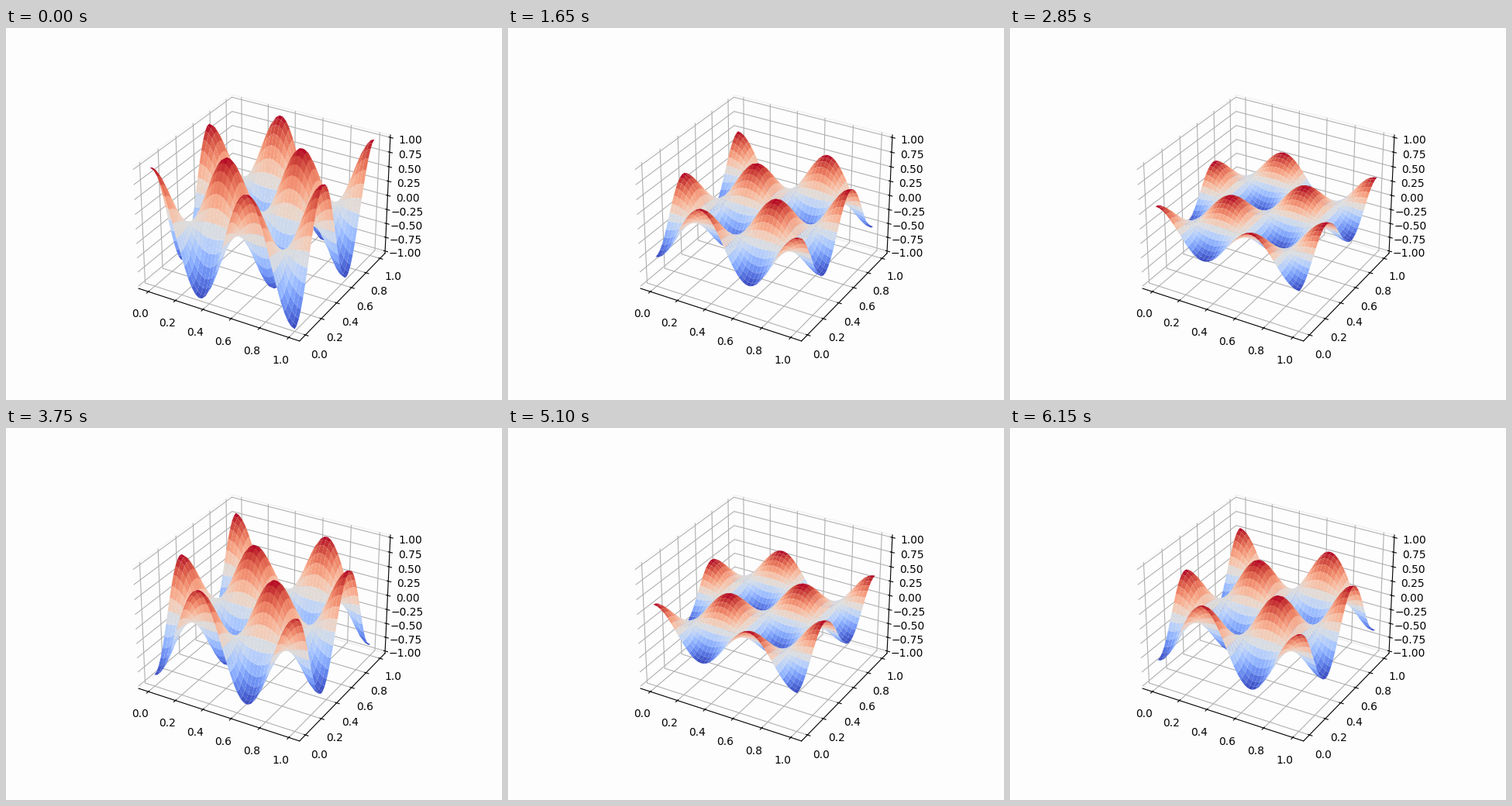
These frames come from a looping animation (640x480 px, 6.3 s). A matplotlib script:

```python
import numpy as np
import matplotlib.pyplot as plt
from matplotlib.animation import FuncAnimation

FRAMES = 42
INTERVAL = 150
CELLS = 40
MODE = 3 * np.pi            # wave number along both axes
OMEGA = MODE * np.sqrt(2)   # standing wave with unit speed
STEP = 1 / 32               # simulated time per frame
PAPER = "#fdfdfd"
MARGIN = 1 / 48

grid = np.linspace(0, 1, CELLS + 1)
X, Y = np.meshgrid(grid, grid, indexing="ij")
SHAPE = np.cos(MODE * X) * np.cos(MODE * Y)

fig = plt.figure(figsize=(6.4, 4.8), dpi=100, facecolor=PAPER)
ax = fig.add_subplot(projection="3d", facecolor=PAPER)


def padded(low, high):
    pad = (high - low) * MARGIN
    return low - pad, high + pad


ax.set_xlim(*padded(-0.05, 1.05))
ax.set_ylim(*padded(-0.05, 1.05))
ax.set_zlim(*padded(-1, 1))
for axis in (ax.xaxis, ax.yaxis, ax.zaxis):
    axis.pane.set_facecolor(PAPER)

surfaces = []


def clear():
    while surfaces:
        surfaces.pop().remove()
    return []


def update(frame):
    clear()
    # the wave rests for one frame before it starts to swing
    height = np.cos(OMEGA * STEP * max(frame - 1, 0))
    surfaces.append(ax.plot_surface(X, Y, height * SHAPE, cmap="coolwarm"))
    return surfaces


ani = FuncAnimation(fig, update, frames=FRAMES, init_func=clear,
                    interval=INTERVAL, repeat=True, blit=False)
plt.show()
```
